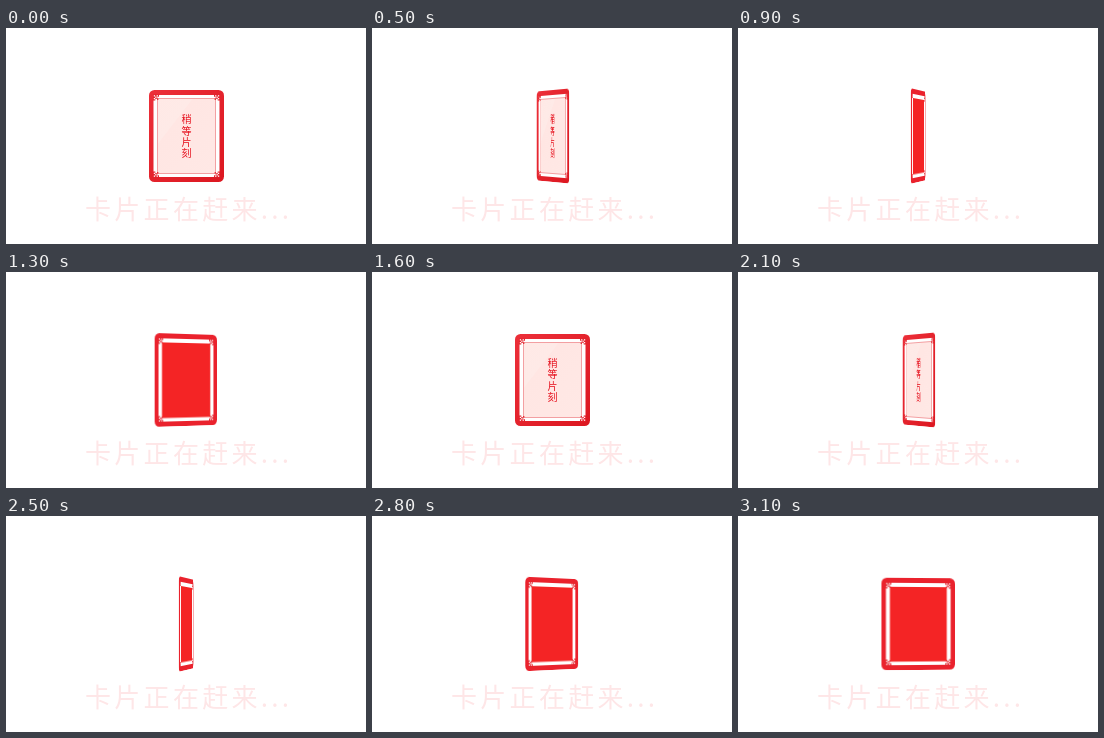
An HTML page for the animation above (3.2 s loop, 360x216 px).

```html
<!DOCTYPE html>
<html lang="zh-CN">
<head>
<meta charset="utf-8">
<title>稍等片刻</title>
<style>
  html, body { margin: 0; width: 100%; height: 100%; overflow: hidden; background: #fff; }
  svg { display: block; position: absolute; }
  text { font-family: "Noto Sans CJK SC", "Noto Sans CJK", sans-serif; }
  .stage { position: relative; width: 360px; height: 216px; overflow: hidden; }
  .scene { position: absolute; left: 142.5px; top: 62px; width: 75px; height: 92px; perspective: 1000px; }
  .card { width: 100%; height: 100%; transform-style: preserve-3d; }
  .face { left: 0; top: 0; width: 75px; height: 92px; backface-visibility: hidden; }
  .back { transform: rotateY(180deg); }
  .caption { left: 0; top: 0; font-size: 26px; font-weight: 500; letter-spacing: 3.3px; }
  .note { font-size: 10px; text-anchor: middle; }
</style>
</head>
<body>
<div class="stage">
  <svg class="caption" width="360" height="216">
    <text x="79" y="191" fill="#fee6e7">卡片正在赶来...</text>
  </svg>
  <div class="scene">
    <div class="card" id="card">
      <svg class="face" viewBox="0 0 75 92">
        <defs>
          <linearGradient id="rim" x1="0" y1="0" x2="1" y2="1">
            <stop offset="0" stop-color="#ec2f39"/>
            <stop offset="1" stop-color="#dc1720"/>
          </linearGradient>
          <linearGradient id="paper" x1="0" y1="0" x2="1" y2="1">
            <stop offset="0" stop-color="#ffe9e6"/>
            <stop offset=".3" stop-color="#feeae7"/>
            <stop offset=".31" stop-color="#ffe6e3"/>
            <stop offset="1" stop-color="#ffe8e5"/>
          </linearGradient>
        </defs>
        <rect width="75" height="92" rx="5.5" fill="url(#rim)"/>
        <rect x="4.5" y="5" width="66" height="82" fill="#fff"/>
        <rect x="8.5" y="8.5" width="58" height="75" fill="url(#paper)" stroke="#ee7d80" stroke-width=".7"/>
        <g class="corners"></g>
        <g class="note" id="note" fill="#e60f1c"></g>
      </svg>
      <svg class="face back" viewBox="0 0 75 92">
        <rect width="75" height="92" rx="5.5" fill="#ea222d"/>
        <rect x="4.5" y="5" width="66" height="82" fill="#fff"/>
        <rect x="8.5" y="9" width="58" height="74.5" fill="#f42425"/>
        <g class="corners"></g>
      </svg>
    </div>
  </div>
</div>
<script>
  const NS = 'http://www.w3.org/2000/svg';
  const STEP = 100, STEPS = 16, EDGE = 7, HALF = 8;

  function add(parent, tag, attrs, text = '') {
    const el = document.createElementNS(NS, tag);
    for (const key in attrs) el.setAttribute(key, attrs[key]);
    el.textContent = text;
    parent.append(el);
    return el;
  }

  // One knot ornament, mirrored into the four corners.
  function corners(group) {
    for (const sx of [1, -1]) for (const sy of [1, -1]) {
      const g = add(group, 'g', {
        transform: `translate(37.5 46) scale(${sx} ${sy}) translate(-37.5 -46)`
      });
      add(g, 'path', { d: 'M4 4.5h6v2.2h-1.7v2h-2v1.8H4z', fill: '#e4232d' });
      for (const [x, y] of [[4.8, 5.2], [7.6, 5.2], [6.2, 6.6], [4.8, 8]])
        add(g, 'rect', { x, y, width: 1.3, height: 1.3, fill: '#fff' });
      add(g, 'rect', { x: 8, y: 8.5, width: 1.4, height: 1.4, fill: '#e4232d' });
    }
  }

  document.querySelectorAll('.corners').forEach(corners);
  const note = document.getElementById('note');
  [...'稍等片刻'].forEach((ch, i) =>
    add(note, 'text', { x: 37.5, y: 33.3 + i * 11.2 }, ch));

  // Front turns edge-on in seven steps, rests one, then the back opens in eight.
  const angle = n => n < HALF
    ? Math.min(n / EDGE, 1) * 90
    : 90 + (n - HALF) / HALF * 90;

  const card = document.getElementById('card');
  const start = performance.now();
  function draw() {
    const n = Math.floor((performance.now() - start + 1) / STEP) % STEPS;
    const a = angle(n);
    card.style.visibility = a === 90 ? 'hidden' : 'visible';
    card.style.transform = `rotateY(${-a}deg)`;
    requestAnimationFrame(draw);
  }
  draw();
</script>
</body>
</html>
```
